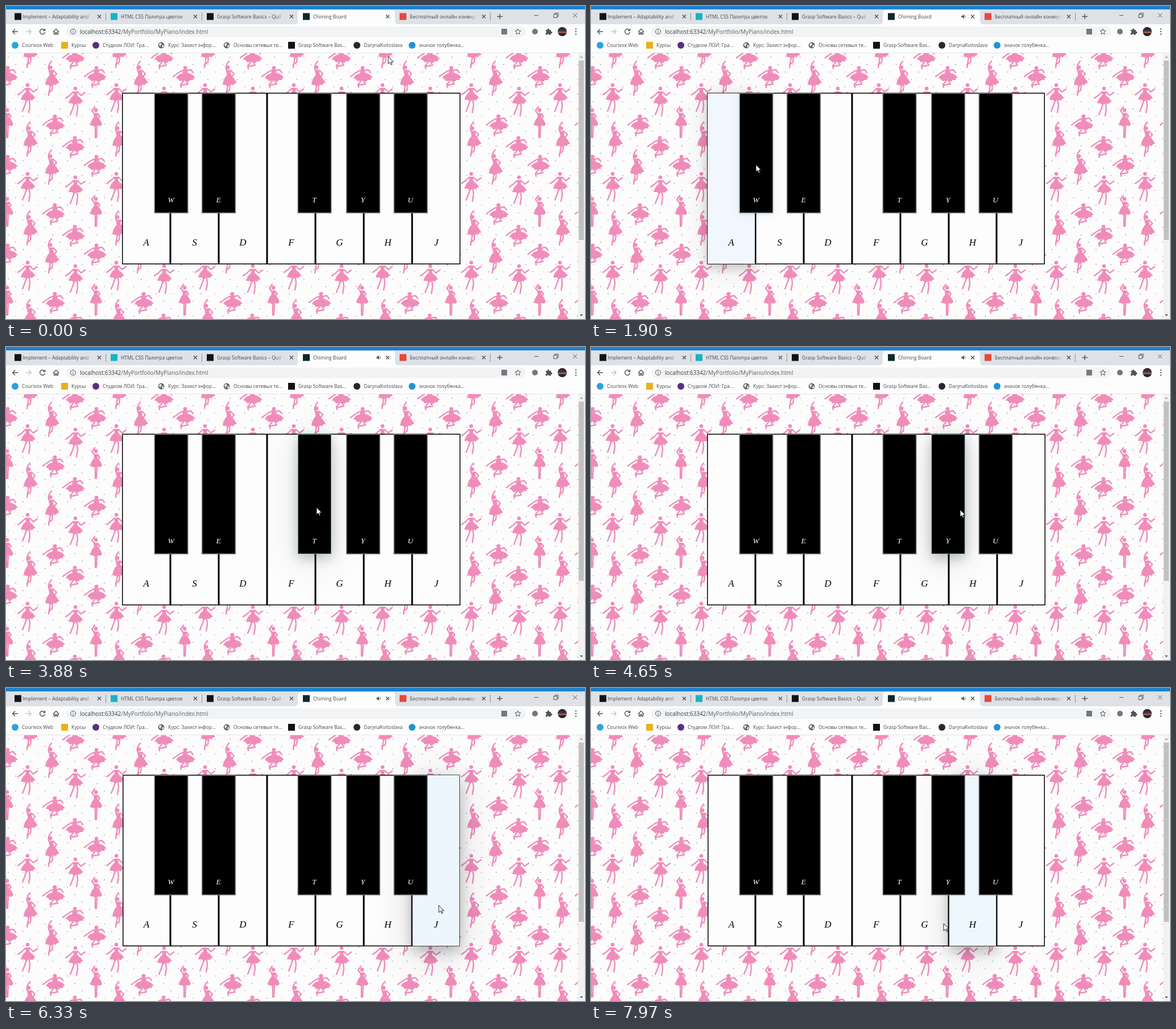
An HTML page for the animation above (8000 ms loop, 1018 by 550 pixels).

```html
<!DOCTYPE html>
<html lang="en">
<head>
<meta charset="utf-8">
<title>Piano</title>
<style>
html, body { margin: 0; width: 100%; height: 100%; overflow: hidden; background: #fcfcfc; }
svg { display: block; width: 100vw; height: 100vh; }
text { font: 8.5px "Open Sans", "Noto Sans", sans-serif; fill: #45484c; white-space: pre; }
.url { font-size: 9.9px; fill: #5f6368; }
.host { fill: #3c4043; }
.letter { font: italic 17px "Liberation Serif", "Noto Serif", serif; text-anchor: middle; fill: #000; }
.letter.small { font-size: 13.5px; fill: #fff; }
.line { fill: none; stroke: #505357; stroke-width: 1.4; }
.thin { stroke-width: 1; }
.limb { fill: none; stroke: #f08cba; stroke-width: 2.4; stroke-linecap: round; stroke-linejoin: round; }
.figure { fill: #f08cba; }
</style>
</head>
<body>
<svg id="stage" viewBox="0 0 1018 550" xmlns="http://www.w3.org/2000/svg">
  <defs>
    <linearGradient id="fade"><stop stop-color="#dee1e6" stop-opacity="0"/><stop offset="1" stop-color="#dee1e6"/></linearGradient>
    <linearGradient id="dusk" x2="0" y2="1"><stop stop-color="#20222e"/><stop offset=".45" stop-color="#453641"/><stop offset=".58" stop-color="#c46a55"/><stop offset=".72" stop-color="#272530"/></linearGradient>
    <clipPath id="page"><path d="M0 83H1006V550H0z"/></clipPath>

    <g id="reach" class="figure">
      <circle cx="-2" cy="-22" r="3.4"/>
      <path d="M-5-17L3-18 4-7-3-6zM-3-9H4Q9-3 14 5L10 6 8 9 3 8-1 11-6 9-11 8Q-10-2-3-9z"/>
      <path class="limb" d="M-4-16Q-8-24 0-33M3-17L9-11 5-6M-2 9L-5 27M2 9L1 18-5 22"/>
    </g>
    <g id="curtsy" class="figure">
      <circle cx="1" cy="-14" r="3.4"/>
      <path d="M-3-11L5-11 6-2-4-2zM-6-4Q6-8 14-2L19 3 15 4 16 7 10 7 7 10-1 8-8 9-11 5-15 4Q-13-2-6-4z"/>
      <path class="limb" d="M-3-10Q-10-7-20 1M5-10L11-11 15-6M-2 9L-7 15-6 20M3 9L6 14-5 16"/>
    </g>
    <g id="step" class="figure">
      <circle cy="-21" r="3.3"/>
      <path d="M-4-16L4-16 3-7-3-7zM-3-9H3Q10-4 14 2L10 3 9 6 3 5-2 8-6 5-12 5Q-10-4-3-9z"/>
      <path class="limb" d="M-4-15L-10-9-17-4M4-15L10-9 17-14M-2 6L-5 15-9 25M3 6L4 15 2 27"/>
    </g>
    <g id="poise" class="figure">
      <circle cy="-21" r="3.4"/>
      <path d="M-4-16L4-16 3-7-3-7zM-3-9H3Q9-3 11 4L8 7 3 6-2 8-6 6-10 6Q-9-3-3-9z"/>
      <path class="limb" d="M-3-15L-7-20-2-27M3-15L7-10 3-6M-1 7L-1 27M2 7L1 27"/>
    </g>
    <g id="tile">
      <use href="#curtsy" x="158" y="123"/>
      <use href="#reach" x="80" y="130"/>
      <use href="#step" x="38" y="160"/>
      <use href="#step" x="122" y="166"/>
      <use href="#poise" x="158" y="204"/>
      <use href="#curtsy" x="85" y="208"/>
      <use href="#reach" x="42" y="237"/>
      <use href="#curtsy" x="120" y="246"/>
    </g>
    <g id="globe"><circle r="5.4" fill="#5f6368"/><path d="M-4-2L-1-4 1-2-1 0-2 3zM1 1L4-1 4 2 2 4z" fill="#fff"/></g>
  </defs>

  <path d="M0 83H1006V550H0z" fill="#fcfcfc"/>
  <g id="paper" clip-path="url(#page)"></g>
  <g id="whites"></g>
  <g id="blacks"></g>

  <path d="M0 0H1018V83H0z" fill="#fdfdfd"/>
  <path d="M0 0H1018V6H0z" fill="#1b82d0"/>
  <path d="M0 6H1018V32H0z" fill="#dee1e6"/>
  <path d="M507 32Q513 32 513 26V13Q513 7 519 7H678Q684 7 684 13V26Q684 32 690 32z" fill="#fdfdfd"/>
  <path d="M0 82.5H1018" stroke="#e2e4e6"/>
  <path d="M175.500 12V26M344.500 12V26M851.500 12V26" stroke="#8d9196"/>
  <g id="tabs"></g>
  <path class="line" d="M863.500 18.500H873M868.200 14V23"/>
  <path class="line thin" d="M929 16.500H936M963 14.500H969V20.500H963zM965 14V12.500H971V18.500H969M997 13L1004 20M1004 13L997 20"/>
  <g id="speaker" fill="#505357"><path d="M651.500 17H653.500L656 14.700V22.300L653.500 20H651.500z"/><path class="line thin" d="M657.500 16.500Q659 18.500 657.500 20.500"/></g>

  <rect x="106" y="36" width="808" height="18.500" rx="9.200" fill="#f1f3f4"/>
  <path class="line" d="M21 45H12M16 40.500L11.700 45 16 49.500"/>
  <path class="line" d="M35 45H44M40 40.500L44.300 45 40 49.500" style="stroke:#c3c5c8"/>
  <path class="line" d="M67.500 42A4.500 4.500 0 1 0 68.500 46M68.500 40V43.300H65"/>
  <path class="line" d="M83 45.500L88 40.500 93 45.500M84.500 44.500V49.500H87V46.500H89V49.500H91.500V44.500"/>
  <circle class="line thin" cx="118" cy="45" r="4.500"/>
  <path class="line thin" d="M118 44.500V47.500M118 42.300V43.300"/>
  <text class="url" x="130" y="48.500"><tspan class="host">localhost:63342</tspan>/MyPortfolio/MyPiano/index.html</text>
  <rect x="871" y="40" width="10" height="10" fill="#74787c"/>
  <path class="line thin" d="M900 40L901.500 43.400 905 43.700 902.300 46.100 903.100 49.600 900 47.700 896.900 49.600 897.700 46.100 895 43.700 898.500 43.400z"/>
  <circle cx="930" cy="45" r="5" fill="#74787c"/>
  <path d="M949 42H952A1.700 1.700 0 1 1 955 42H958V45A1.700 1.700 0 1 1 958 48V50.500H954.500A1.500 1.500 0 0 0 951.500 50.500H949V47A1.500 1.500 0 0 0 949 44z" fill="#505357"/>
  <circle cx="978" cy="45" r="8" fill="url(#dusk)"/>
  <path d="M1002 40.500h.01M1002 45h.01M1002 49.500h.01" stroke="#505357" stroke-width="2.300" stroke-linecap="round"/>
  <g id="marks"></g>

  <path d="M1006 83H1018V550H1006z" fill="#f1f1f1"/>
  <path d="M1007 96H1016V411H1007z" fill="#c1c1c1"/>
  <path d="M1009 91L1011.700 88 1014.400 91z" fill="#a0a0a0"/>
  <path d="M1009 542L1011.700 545 1014.400 542z" fill="#505050"/>
  <path id="cursor" d="M0 0V12.500L3 9.800 5 14.300 6.900 13.400 5 9.200H9z" fill="#fff" stroke="#000" stroke-width=".85"/>
</svg>
<script>
const $ = id => document.getElementById(id);

function add(parent, tag, attrs, text = '') {
  const node = document.createElementNS('http://www.w3.org/2000/svg', tag);
  set(node, attrs);
  node.textContent = text;
  return parent.appendChild(node);
}
function set(node, attrs) {
  for (const name in attrs) node.setAttribute(name, attrs[name]);
}
function icon(parent, kind, color, x, y) {
  if (kind === 'globe') add(parent, 'use', { href: '#globe', x, y });
  else if (kind === 'circle') add(parent, 'circle', { cx: x, cy: y, r: 6, fill: color });
  else add(parent, 'rect', { x: x - 6, y: y - 6, width: 12, height: 12, fill: color });
}

// Browser tabs: icon x, colour, title, close button x
[
  [21, '#111', 'Implement – Adaptability and', 164],
  [190, '#16b4c3', 'HTML CSS Палитра цветов', 333],
  [359, '#111', 'Grasp Software Basics – Quil', 502],
  [528, '#10252d', 'Chiming Board', 671],
  [698, '#e5493f', 'Бесплатный онлайн конвертер', 840]
].forEach(([x, color, title, close], i) => {
  const g = $('tabs');
  icon(g, 'square', color, x, 18.5);
  add(g, 'text', { x: x + (i ? 12 : 8), y: 22 }, title);
  if (i !== 3) {
    add(g, 'rect', { x: close - 28, y: 9, width: 18, height: 20, fill: 'url(#fade)' });
    add(g, 'rect', { x: close - 10, y: 9, width: 19, height: 20, fill: '#dee1e6' });
  }
  add(g, 'path', { class: 'line', d: `M${close - 3} 15.5l6 6m0-6l-6 6` });
});

[
  [16, 'circle', '#2ba3dc', 'Courivox Web'],
  [103, 'square', '#e9b01e', 'Курсы'],
  [158, 'circle', '#59307f', 'Студком ЛОИ: Гра...'],
  [273, 'globe', '', 'Курс: Захист інфор...'],
  [388, 'globe', '', 'Основы сетевых те...'],
  [502, 'square', '#111', 'Grasp Software Bas...'],
  [617, 'circle', '#24292e', 'DarynaKvitoslava'],
  [714, 'circle', '#2292d6', 'значок голубянка...']
].forEach(([x, kind, color, title]) => {
  icon($('marks'), kind, color, x, 69);
  add($('marks'), 'text', { x: x + 12, y: 72 }, title);
});

// Dotted wallpaper with dancers
const TILE = 156, tints = ['#b3abea', '#f3a8cb', '#f0cf96'];
for (let r = 0; r < 12; r++) for (let c = r % 2; c < 12; c += 2)
  add($('tile'), 'circle', { cx: c * 13 + 4, cy: 90 + r * 13, r: 1.1, fill: tints[(r * 2 + c) % 3] });
for (let i = -1; i < 7; i++) for (let j = -1; j < 3; j++)
  add($('paper'), 'use', { href: '#tile', x: i * TILE, y: j * TILE });

// Piano keys
const KEY = 84.9, TOP = 152.5, CENTER = 501.4;
const blackX = [260.5, 344, 512.5, 598, 681.5];
const whites = [...'ASDFGHJ'].map(name => {
  const g = $('whites');
  return {
    rect: add(g, 'rect', { stroke: '#000' }),
    label: add(g, 'text', { class: 'letter', y: 421 }, name)
  };
});
const blacks = [...'WETYU'].map((name, i) => {
  const g = $('blacks'), x = blackX[i];
  const rect = add(g, 'rect', { x: x + .8, y: 153.5, width: 58.4, height: 210, fill: '#000' });
  add(g, 'text', { class: 'letter small', x: x + 29.5, y: 344.5 }, name);
  return { rect };
});

// Pointer stops: arrive, leave, x, y
const LOOP = 8000;
const stops = [
  [0, 300, 672, 89], [800, 800, 470, 140], [880, 880, 400, 235],
  [1100, 1100, 352, 264], [1170, 1200, 321, 270], [1450, 1750, 235, 278],
  [1850, 2200, 290, 279], [2260, 2540, 332, 280], [2600, 2600, 351, 281],
  [2700, 2950, 374, 281], [3050, 3250, 432, 281], [3350, 3480, 490, 282],
  [3620, 3900, 546, 282], [4050, 4250, 585, 283], [4350, 4600, 628, 285],
  [4700, 5040, 670, 287], [5150, 5500, 718, 290], [5640, 5640, 758, 310],
  [6000, 6900, 761, 382], [7300, 7850, 672, 412], [7970, LOOP, 620, 414]
];
function pointer(t) {
  const i = stops.findLastIndex(s => s[0] <= t);
  const [, leave, x, y] = stops[i], next = stops[i + 1];
  if (t <= leave || !next) return [x, y];
  const p = (t - leave) / (next[0] - leave);
  return [x + (next[2] - x) * p, y + (next[3] - y) * p];
}

// Index of the hovered key: 0-6 white, 7-11 black, -1 none
function hit([x, y]) {
  if (y < 153 || y > 454 || x < 205 || x > 798) return -1;
  const b = blackX.findIndex(left => x >= left && x < left + 60);
  return b >= 0 && y < 364 ? 7 + b : Math.min(6, Math.floor((x - 204.3) / KEY));
}

// Hover amounts over the loop, each fading linearly in 400 ms
const STEP = 10, FADE = 400;
const levels = [Array(12).fill(0)];
for (let t = STEP; t <= LOOP; t += STEP) {
  const over = hit(pointer(t));
  levels.push(levels.at(-1).map((v, k) =>
    Math.max(0, Math.min(1, v + (k === over ? STEP : -STEP) / FADE))));
}

const mix = (a, b, v) => `rgb(${a.map((n, i) => n + (b[i] - n) * v)})`;
const shadow = v => v
  ? `drop-shadow(0 ${9 * v}px ${12 * v}px rgba(0,0,0,${.24 * v})) drop-shadow(0 ${11 * v}px ${34 * v}px rgba(0,0,0,${.14 * v}))`
  : 'none';

function draw(t) {
  const level = levels[Math.floor(t / STEP)];
  const widths = whites.map((_, k) => KEY - .6 * level[k]);
  let x = CENTER - widths.reduce((a, b) => a + b) / 2;
  whites.forEach(({ rect, label }, k) => {
    const v = level[k], line = 1.5 - .8 * v;
    const left = Math.round(x), right = Math.round(x += widths[k]);
    set(rect, {
      x: left + line / 2, y: TOP + line / 2,
      width: right - left - line, height: 301.5 - line,
      'stroke-width': line, fill: mix([253, 253, 253], [237, 245, 254], v)
    });
    rect.style.filter = shadow(v);
    label.setAttribute('x', (left + right) / 2);
  });
  blacks.forEach(({ rect }, k) => {
    const v = level[7 + k];
    set(rect, { stroke: mix([116, 116, 116], [120, 196, 190], v), 'stroke-width': 1.6 - .8 * v });
    rect.style.filter = shadow(v);
  });
  $('cursor').setAttribute('transform', `translate(${pointer(t)})`);
  $('speaker').setAttribute('visibility', t < 1550 ? 'hidden' : 'visible');
}

let start;
function frame(now) {
  start ??= now;
  draw((now - start) % LOOP);
  requestAnimationFrame(frame);
}
draw(0);
requestAnimationFrame(frame);
</script>
</body>
</html>
```
